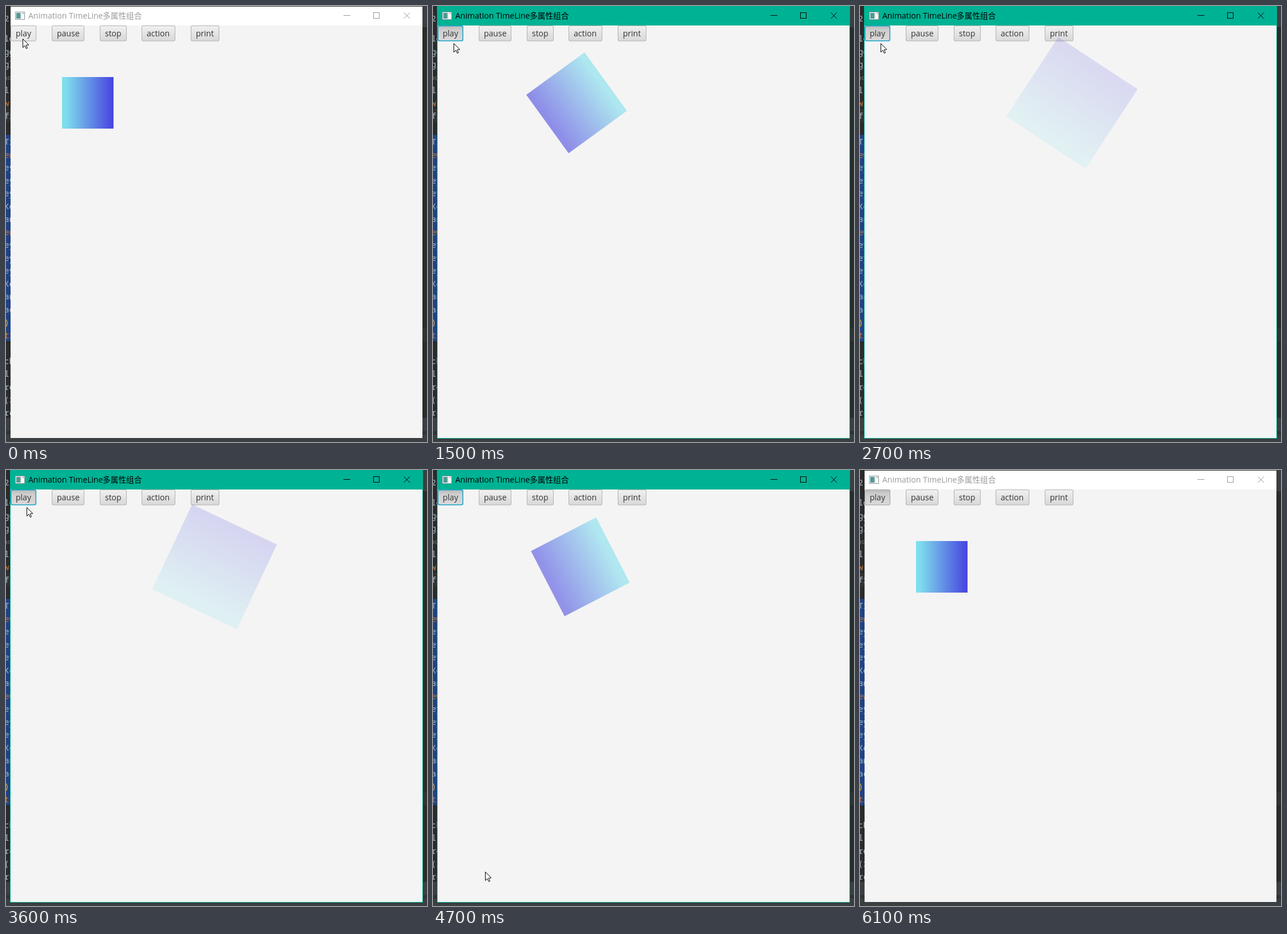
Recreate the animation shown at these times as an HTML page with a canvas. Size 736 by 761 pixels, loop 6200 ms.

```html
<!DOCTYPE html>
<html lang="zh">
<head>
<meta charset="utf-8">
<title>Animation TimeLine</title>
<style>
  html, body { margin: 0; width: 100%; height: 100%; overflow: hidden; background: #2b2b2b; }
  canvas { display: block; }
</style>
</head>
<body>
<canvas id="stage" width="736" height="761"></canvas>
<script>
const ctx = document.getElementById('stage').getContext('2d');
const LOOP = 6200, STEP = 100;
const SANS = '"Open Sans", "Noto Sans", sans-serif';
const CJK = '"Noto Sans CJK SC", "Noto Sans CJK", sans-serif';
const MONO = '"Noto Sans Mono", monospace';

// Keyframes: [time, value, ...]
const PROGRESS = [[375, 0], [700, .1172], [1500, .4], [2700, .8425], [3105, 1],
                  [4200, .6025], [5200, .246], [5890, 0]];
const POINTER = [[200, 29, 57], [300, 30, 56], [900, 30, 56], [1400, 36, 65],
                 [3900, 36, 65], [4200, 68, 198], [4600, 88, 622], [4800, 94, 780]];
const BUTTONS = [['play', 8, 45], ['pause', 80, 57], ['stop', 164, 47],
                 ['action', 237, 59], ['print', 323, 50]];
const CODE = ['2.', '', 'le', 'gg', 'gl', 'ac', 'l(', 'w ', 'fi', '', 'Ti', 'ew', 'ey', 'ey',
              'ey', 'Ke', 'an', 'ew', 'ey', 'ey', 'ey', 'Ke', 'an', 'ac', ');', 'tr', '',
              'ch', 'l(', 're', '(r', 'rc'];
const KEYWORDS = ['w ', 'ew', 'tr'];

function sample(keys, t, k = 1) {
  const next = keys.findIndex(key => key[0] > t);
  if (next === 0) return keys[0][k];
  if (next < 0) return keys[keys.length - 1][k];
  const a = keys[next - 1], b = keys[next];
  return a[k] + (b[k] - a[k]) * (t - a[0]) / (b[0] - a[0]);
}

function rect(color, x, y, w, h) {
  ctx.fillStyle = color;
  ctx.fillRect(x, y, w, h);
}

function text(str, x, y, color, size = 14, family = SANS) {
  ctx.font = `${size}px ${family}`;
  ctx.fillStyle = color;
  ctx.fillText(str, x, y);
}

function gradient(x0, y0, x1, y1, ...stops) {
  const g = ctx.createLinearGradient(x0, y0, x1, y1);
  stops.forEach(([at, color]) => g.addColorStop(at, color));
  return g;
}

function roundRect(fill, x, y, w, h, r) {
  ctx.fillStyle = fill;
  ctx.beginPath();
  ctx.roundRect(x, y, w, h, r);
  ctx.fill();
}

function drawEditor() {
  rect('#2b2b2b', 0, 0, 736, 761);
  rect('#3c3f41', 728, 0, 8, 37);
  rect('#214283', 0, 225, 8, 360);
  rect('#323232', 0, 180, 8, 23);
  rect('#323232', 728, 562, 8, 23);
  rect('#3c3f41', 0, 719, 736, 23);
  rect('#313335', 0, 742, 736, 6);
  rect('#3c3f41', 0, 748, 736, 13);
  CODE.forEach((line, i) => {
    const y = i ? 17 + i * 22.5 : 27;
    if (line === 'ac' && i < 9) text(line, -3, y - 1, '#787878', 10, MONO);
    else text(line, -3, y, KEYWORDS.includes(line) ? '#cc7832' : line === ');' ? '#e8ba36' : '#a9b7c6', 14, MONO);
  });
}

function drawWindow(active) {
  const ink = active ? '#000' : '#999';
  if (active) rect('#00b294', 7, 0, 722, 755);
  rect(active ? '#00b294' : '#fff', 8, active ? 0 : 1, 720, 34);
  rect('#f4f4f4', 8, 34, 720, 720);

  rect('#8a9294', 16, 10, 17, 14);
  rect('#fff', 17, 11, 15, 12);
  rect('#4f9a94', 18, 12, 7, 10);
  rect('#c9d3d3', 25, 12, 2, 10);
  rect('#9aa5a8', 29, 12, 2, 2);

  text('Animation TimeLine', 39, 22, ink);
  text('多属性组合', 169, 22, ink, 13.7, CJK);

  rect(ink, 590, 16, 12, 1);
  ctx.strokeStyle = ink;
  ctx.lineWidth = 1;
  ctx.strokeRect(642.5, 11.5, 10, 10);
  ctx.beginPath();
  ctx.moveTo(695.5, 11.5); ctx.lineTo(706, 22);
  ctx.moveTo(706, 11.5); ctx.lineTo(695.5, 22);
  ctx.stroke();
}

function drawButton([label, x, w], pressed, focused) {
  const fill = pressed
    ? gradient(0, 35, 0, 61, [0, '#bcbcbc'], [.3, '#cfcfcf'], [1, '#d9d9d9'])
    : gradient(0, 35, 0, 61, [0, '#f0f0f0'], [1, label === 'play' ? '#e6e6e6' : '#d8d8d8']);
  roundRect(focused ? '#1aa3c4' : pressed ? '#a3a3a3' : '#b2b2b2', x, 34, w, 27.5, 3);
  const edge = focused ? 1.5 : 1;
  roundRect(fill, x + edge, 34 + edge, w - 2 * edge, 27.5 - 2 * edge, 2);
  text(label, x + 9, 53, '#333');
}

function drawSquare(p) {
  const alpha = 1 - p;
  if (alpha < .06) return;
  ctx.save();
  ctx.translate(143 + 270 * p, 169);
  ctx.rotate(2 * Math.PI * p);
  ctx.scale(1 + p, 1 + p);
  ctx.globalAlpha = alpha;
  rect(gradient(-45, 0, 45, 0, [.07, '#7edeed'], [.95, '#4a4ae0']), -45, -45, 90, 90);
  ctx.restore();
}

function drawPointer(x, y) {
  ctx.save();
  ctx.translate(x + .5, y + .5);
  ctx.beginPath();
  [[0, 0], [0, 15], [3.4, 11.7], [6, 17], [8, 16], [5.6, 10.8], [10.3, 10.5]]
    .forEach(point => ctx.lineTo(...point));
  ctx.closePath();
  ctx.fillStyle = '#fff';
  ctx.fill();
  ctx.strokeStyle = '#000';
  ctx.lineWidth = 1;
  ctx.stroke();
  ctx.restore();
}

function draw(now) {
  const t = Math.floor(now % LOOP / STEP) * STEP;
  const active = t >= 300 && t < 6100;
  drawEditor();
  drawWindow(active);
  BUTTONS.forEach((button, i) => drawButton(button, !i && t >= 300, !i && active));
  drawSquare(sample(PROGRESS, t));
  if (t < 4800) drawPointer(sample(POINTER, t, 1), sample(POINTER, t, 2));
  requestAnimationFrame(draw);
}
draw(0);
</script>
</body>
</html>
```
